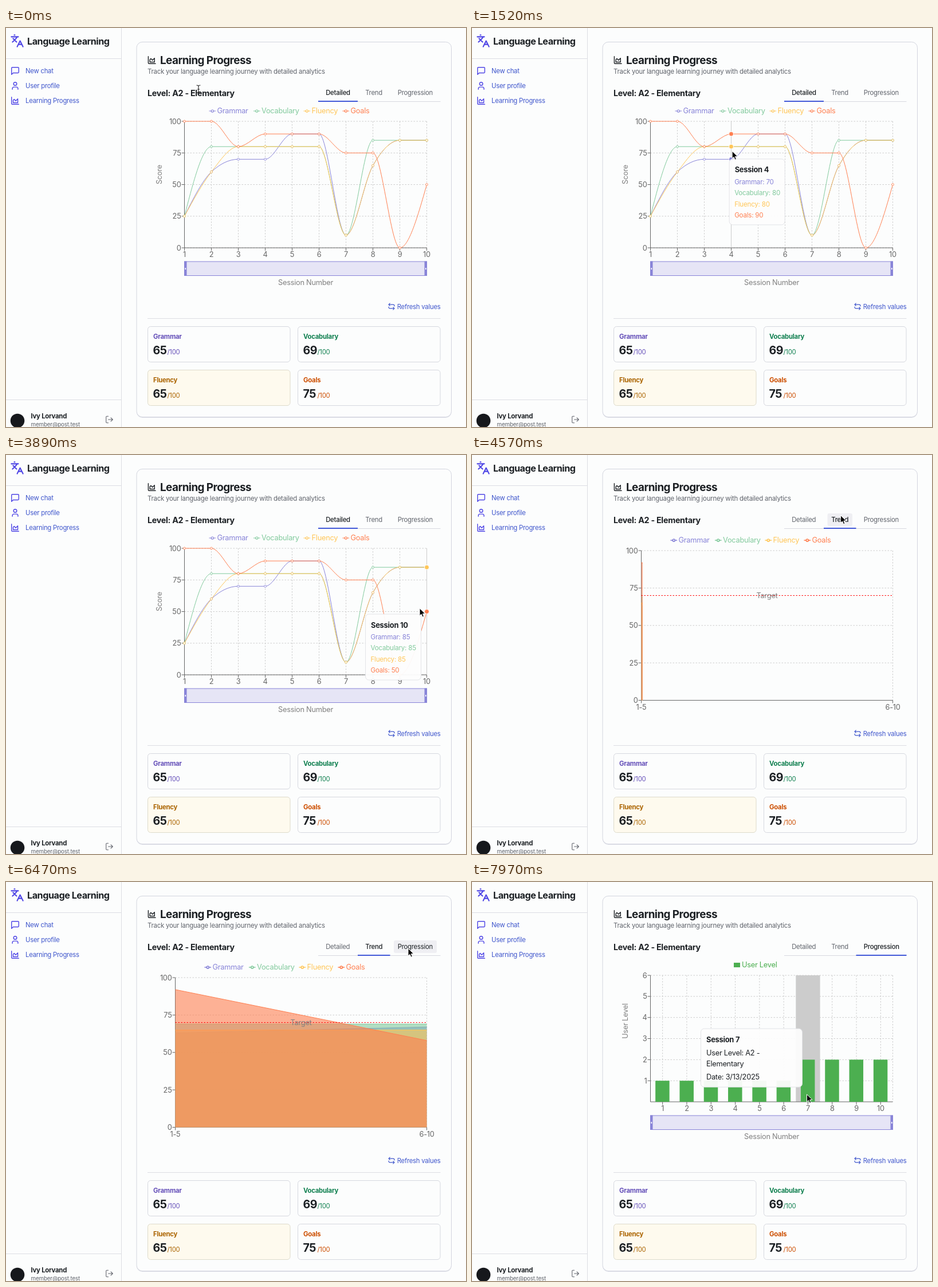
Animation of 803 by 697 pixels, one loop 8000 ms. Source, as an HTML page:

```html
<!DOCTYPE html>
<html lang="en">
<head>
<meta charset="utf-8">
<title>Learning Progress</title>
<style>
html, body { margin: 0; width: 100%; height: 100%; overflow: hidden; background: #fcfdfd; }
svg { display: block; width: 803px; height: 697px; }
text { font-family: Inter, "Open Sans", sans-serif; letter-spacing: -.02em; white-space: pre; }
.icon { fill: none; stroke-linecap: round; stroke-linejoin: round; }
</style>
</head>
<body>
<svg id="stage" viewBox="0 0 803 697" xmlns="http://www.w3.org/2000/svg"></svg>
<script>
const LOOP = 8000, TREND_AT = 4510, LEVELS_AT = 6680;
const HOVER_LAG = 100, GLIDE = 400;
const INK = '#1c2024', GRAY = '#60646c', LINK = '#3f56cc', ACCENT = '#4f46e5', RULE = '#dcdde3';
const SERIES = [
  { name: 'Grammar', color: '#8884d8', tone: '#6550b9', values: [25, 60, 70, 70, 90, 90, 10, 65, 85, 85] },
  { name: 'Vocabulary', color: '#82ca9d', tone: '#0f7f4f', values: [25, 80, 80, 80, 80, 80, 10, 85, 85, 85] },
  { name: 'Fluency', color: '#ffc658', tone: '#ab6400', values: [25, 60, 80, 80, 80, 80, 10, 65, 85, 85] },
  { name: 'Goals', color: '#ff7f50', tone: '#cc4e00', values: [100, 100, 80, 90, 90, 90, 75, 75, 0, 50] }
];
const TABS = [
  { name: 'Detailed', from: 545, to: 614 },
  { name: 'Trend', from: 614, to: 670.5 },
  { name: 'Progression', from: 670.5, to: 758.5 }
];
const sessions = [1, 2, 3, 4, 5, 6, 7, 8, 9, 10];
const scores = [0, 25, 50, 75, 100];
const levelOf = n => n > 6 ? 2 : 1;
const mean = list => list.reduce((a, b) => a + b) / list.length;

// Stops of the pointer: time, x, y
const POINTER = [
  [90, 336, 106], [850, 397, 220], [1240, 428, 220], [1520, 454, 215], [2600, 579, 204],
  [3000, 722, 268], [3890, 722, 268], [4100, 735, 215], [4400, 643.5, 105.5],
  [6120, 643.5, 105.5], [6470, 702, 116], [7147, 702, 116], [7340, 629, 225], [7970, 584.5, 371]
];

const text = (x, mid, str, size = 11.3, fill = INK, extra = '') =>
  `<text x="${x}" y="${mid + size * .36}" font-size="${size}" fill="${fill}" ${extra}>${str}</text>`;
const line = (x1, y1, x2, y2, color = '#666', extra = '') =>
  `<path d="M${x1} ${y1}L${x2} ${y2}" fill="none" stroke="${color}" ${extra}/>`;
const rect = (x, y, w, h, fill, extra = '') =>
  `<rect x="${x}" y="${y}" width="${w}" height="${h}" fill="${fill}" ${extra}/>`;
const icon = (cx, cy, scale, color, d, width = 2) =>
  `<path class="icon" transform="translate(${cx - 12 * scale} ${cy - 12 * scale}) scale(${scale})" d="${d}" stroke="${color}" stroke-width="${width}"/>`;
const BOLD = 'font-weight="700"', MIDDLE = 'text-anchor="middle"', END = 'text-anchor="end"';
const TITLE = 'font-weight="700" style="letter-spacing:-.03em"';
const DASH = 'stroke-dasharray="2.5 2.5"';
const dashed = (...p) => line(...p, '#ccc', DASH);
const upright = (mid, str) => text(0, 0, str, 12.8, '#808080', `${MIDDLE} transform="translate(267 ${mid}) rotate(-90)"`);

const ICONS = {
  languages: 'M5 8l6 6M4 14l6-6 2-3M2 5h12M7 2h1M22 22l-5-10-5 10M14 18h6',
  chat: 'M21 15a2 2 0 0 1-2 2H7l-4 4V5a2 2 0 0 1 2-2h14a2 2 0 0 1 2 2z',
  user: 'M19 21v-2a4 4 0 0 0-4-4H9a4 4 0 0 0-4 4v2M8 7a4 4 0 1 0 8 0a4 4 0 1 0-8 0',
  chart: 'M3 3v16a2 2 0 0 0 2 2h16M7 11l2.5-2.5 4 4 5-5V17H7z',
  logout: 'M9 21H5a2 2 0 0 1-2-2V5a2 2 0 0 1 2-2h4M16 17l5-5-5-5M21 12H9',
  refresh: 'M7 2L3 6l4 4M3 6h14a4 4 0 0 1 4 4v1M17 22l4-4-4-4M21 18H7a4 4 0 0 1-4-4v-1'
};

function sidebar() {
  const items = [['New chat', 'chat'], ['User profile', 'user'], ['Learning Progress', 'chart']].map(([name, key], i) =>
    icon(16, 75 + 26 * i, .7, ACCENT, ICONS[key]) + text(34, 75 + 26 * i, name, 11.3, LINK)).join('');
  return line(201.5, 0, 201.5, 697, RULE) + line(0, 53.5, 201, 53.5, RULE) + line(0, 649.5, 201, 649.5, RULE) +
    icon(19.5, 22.5, 1.02, ACCENT, ICONS.languages) + text(37, 23, 'Language Learning', 16.2, INK, TITLE) + items +
    '<circle cx="20" cy="686" r="12.3" fill="#16181c"/>' +
    text(43.5, 678, 'Ivy Lorvand', 11.3, INK, BOLD) + text(43.5, 692.5, 'member@post.test', 9.9, GRAY) +
    icon(180.5, 684, .64, GRAY, ICONS.logout, 1.7);
}

function card() {
  const stats = SERIES.map((s, i) => {
    const x = 247.5 + (i % 2) * 262, y = 521.5 + (i >> 1) * 76, warm = s.name === 'Fluency';
    return rect(x, y, 248.5, 62, warm ? '#fefaee' : '#fcfdfd', `rx="5" stroke="${warm ? '#dedbcb' : '#d6d8df'}"`) +
      text(x + 9.5, y + 17.5, s.name, 11.3, s.tone, BOLD) + text(x + 9, y + 41.5, mean(s.values), 19.6, INK, BOLD) +
      text(x + 34, y + 44, '/100', 11.3, s.tone);
  }).join('');
  return rect(228, 27, 549.5, 654, '#dfe0e8', 'rx="10"') +
    rect(228, 24.5, 549.5, 655, '#fcfdfd', 'rx="10" stroke="#d3d5df"') +
    icon(254.7, 56, .7, INK, ICONS.chart) + text(269, 56.5, 'Learning Progress', 18.9, INK, TITLE) +
    text(247, 76, 'Track your language learning journey with detailed analytics', 11.4, GRAY) +
    text(247, 113.5, 'Level: A2 - Elementary', 14.3, INK, BOLD) +
    icon(673, 486.5, .56, LINK, ICONS.refresh) + text(758.5, 486.5, 'Refresh values', 11.3, LINK, END) +
    line(247, 507.5, 758.5, 507.5, RULE) + stats;
}

const tabs = () => line(545, 128.5, 758.5, 128.5, '#d8d9e0') + TABS.map((tab, i) =>
  rect(tab.from + 6.5, 102, tab.to - tab.from - 13, 22, '#efeff3', `rx="3" id="pill${i}"`) +
  text(tab.from + 13.2, 113, tab.name, 11.3, GRAY, `id="tab${i}"`)).join('') +
  rect(0, 127, 0, 2, '#4259d8', 'id="underline"');

function legend(dx, mid, width) {
  const starts = [354.5, 432, 519.5, 587.5];
  return SERIES.map((s, i) => {
    const x = starts[i] + dx, pen = `stroke="${s.color}" stroke-width="${width}"`;
    return `<path d="M${x} ${mid + 1}h3.8m4 0h3.8" ${pen}/><circle cx="${x + 5.8}" cy="${mid + 1}" r="2" fill="none" ${pen}/>` +
      text(x + 14, mid, s.name, 12.8, s.color);
  }).join('');
}

const brush = () => rect(311.5, 408, 423, 24.5, '#e6e5f6', 'stroke="#8884d8"') +
  [311, 730.5].map(x => rect(x, 407.5, 4.5, 25.5, '#8884d8') + rect(x + 1.5, 419, 1.6, 3, '#fff')).join('') +
  text(523, 444, 'Session Number', 12.8, '#808080', MIDDLE);

function axes(left, top, bottom, yTicks, xTicks) {
  return line(left, top, left, bottom) + line(left, bottom, 734.5, bottom) +
    yTicks.map(([y, s]) => line(left - 5, y, left, y) + text(left - 6, y, s, 12.8, '#666', END)).join('') +
    xTicks.map(([x, s]) => line(x, bottom, x, bottom + 5) + text(x, bottom + 11.5, s, 12.8, '#666', MIDDLE)).join('');
}

const STEP = 47, BAND = 42.3;
const sessionX = n => 311.5 + (n - 1) * STEP;
const bandX = n => 311.5 + (n - .5) * BAND;
const scoreY = v => 384 - v * 2.21;
const trendY = v => 428.5 - v * 2.615;
const levelY = v => 384 - v * 36.83;

// Monotone cubic through evenly spaced points
function monotone(values) {
  const y = values.map(scoreY), last = y.length - 1;
  const rise = i => y[i + 1] - y[i];
  const m = y.map((_, i) => {
    const a = rise(Math.max(i - 1, 0)), b = rise(Math.min(i, last - 1));
    return (Math.sign(a) + Math.sign(b)) * Math.min(Math.abs(a), Math.abs(b), Math.abs(a + b) / 4);
  });
  m[0] = (3 * rise(0) - m[1]) / 2;
  m[last] = (3 * rise(last - 1) - m[last - 1]) / 2;
  return `M${sessionX(1)} ${y[0]}` + y.slice(1).map((end, i) => {
    const x = sessionX(i + 1);
    return `C${x + STEP / 3} ${y[i] + m[i] / 3} ${x + STEP * 2 / 3} ${end - m[i + 1] / 3} ${x + STEP} ${end}`;
  }).join('');
}

function detailedChart() {
  return scores.map(v => dashed(311.5, scoreY(v), 734.5, scoreY(v))).join('') +
    sessions.map(n => dashed(sessionX(n), 163, sessionX(n), 384)).join('') +
    axes(311.5, 163, 384, scores.map(v => [scoreY(v), v]), sessions.map(n => [sessionX(n), n])) +
    legend(0, 144, 1.2) + upright(256, 'Score') + brush() + '<g id="guide"></g>' +
    SERIES.map(s => `<path d="${monotone(s.values)}" fill="none" stroke="${s.color}"/>` + s.values.map((v, i) =>
      `<circle cx="${sessionX(i + 1)}" cy="${scoreY(v)}" r="1.9" fill="#fff" stroke="${s.color}" stroke-width=".9"/>`).join('')).join('') +
    '<g id="dots"></g>';
}

function trendChart() {
  const areas = SERIES.map(s => {
    const a = trendY(mean(s.values.slice(0, 5))), b = trendY(mean(s.values.slice(5)));
    return `<path d="M295.5 ${a}L734.5 ${b}V428.5H295.5Z" fill="${s.color}" fill-opacity=".6"/>` + line(295.5, a, 734.5, b, s.color);
  }).join('');
  return scores.map(v => dashed(295.5, trendY(v), 734.5, trendY(v))).join('') + dashed(734.5, 167, 734.5, 428.5) +
    axes(295.5, 167, 428.5, scores.map(v => [trendY(v), v]), [[295.5, '1-5'], [734.5, '6-10']]) +
    legend(-8, 148, 1.7) +
    `<clipPath id="reveal">${rect(295, 160, 0, 270, '#000', 'id="revealBox"')}</clipPath><g clip-path="url(#reveal)">${areas}</g>` +
    line(295.5, trendY(70), 734.5, trendY(70), '#f00', DASH) + text(515, trendY(70), 'Target', 12.8, '#808080', MIDDLE);
}

function levelChart() {
  const levels = [1, 2, 3, 4, 5, 6];
  return levels.map(v => dashed(311.5, levelY(v), 734.5, levelY(v))).join('') +
    sessions.map(n => dashed(bandX(n), 163, bandX(n), 384)).join('') + dashed(734.5, 163, 734.5, 384) +
    rect(0, 163, BAND, 221, '#ccc', 'id="band"') +
    axes(311.5, 163, 384, levels.map(v => [levelY(v), v]), sessions.map(n => [bandX(n), n])) +
    rect(457, 141, 11, 8, '#4caf50') + text(471, 144, 'User Level', 12.8, '#4caf50') +
    upright(243, 'User Level') + brush() +
    sessions.map(n => rect(bandX(n) - 12.5, 384, 24.5, 0, '#4caf50', `id="bar${n}"`)).join('');
}

const tipSize = page => page === 2 ? [177, 102] : [97, 115];

function tipContent(n, page) {
  const rows = page === 2
    ? [['User Level: A2 -', 42], ['Elementary', 61], ['Date: 3/13/2025', 84]].map(([s, y]) => text(9.5, y, s, 12.8))
    : SERIES.map((s, i) => text(9, 39.5 + i * 19.5, `${s.name}: ${s.values[n - 1]}`, 11.6, s.color));
  return rect(0, 0, ...tipSize(page), '#fdfdfd', 'rx="6" fill-opacity=".95" stroke="#e3e4e8"') +
    text(9.5, 19, 'Session ' + n, 12.9, INK, BOLD) + rows.join('');
}

document.getElementById('stage').innerHTML = rect(0, 0, 803, 697, '#fcfdfd') + sidebar() + card() + tabs() +
  [detailedChart, trendChart, levelChart].map((draw, i) => `<g id="chart${i}">${draw()}</g>`).join('') +
  '<g id="tip"></g>' +
  `<g id="pointer"><path id="arrow" d="M0 0V13L3 10.4 5.1 15.2 7.3 14.2 5.3 9.6 9.4 9.2Z" fill="#000" stroke="#fff" stroke-linejoin="round"/>
   <path id="beam" class="icon" d="M-3-6Q0-6 0-4Q0-6 3-6M0-4V5M-3 7Q0 7 0 5Q0 7 3 7M-1.5 1H1.5" stroke="#222" stroke-width="1.1"/></g>`;

const el = Object.fromEntries([...document.querySelectorAll('[id]')].map(e => [e.id, e]));
const set = (id, attrs) => { for (const k in attrs) el[id].setAttribute(k, attrs[k]); };
const show = (id, on) => set(id, { display: on ? 'inline' : 'none' });
const clamp = p => Math.max(0, Math.min(1, p));
const pageAt = t => t < TREND_AT ? 0 : t < LEVELS_AT ? 1 : 2;

// cubic-bezier(.25, .1, .25, 1)
function ease(p) {
  if (p <= 0 || p >= 1) return clamp(p);
  let lo = 0, hi = 1, s = .5;
  for (let i = 0; i < 20; i++, s = (lo + hi) / 2) {
    if (.75 * s * (1 - s) + s ** 3 < p) lo = s; else hi = s;
  }
  return .3 * s * (1 - s) ** 2 + 3 * s * s * (1 - s) + s ** 3;
}

function pointerAt(t) {
  const last = POINTER.length - 1;
  const i = Math.max(1, POINTER.findIndex((stop, k) => stop[0] > t || k === last));
  const a = POINTER[i - 1], b = POINTER[i];
  let p = clamp((t - a[0]) / (b[0] - a[0]));
  if (i === last) p = 1 - (1 - p) ** 3; // settles gently at the end
  return [a[1] + (b[1] - a[1]) * p, a[2] + (b[2] - a[2]) * p];
}

// Session under the pointer, 0 outside the plot
function hoverAt(t) {
  const [x, y] = pointerAt(t - HOVER_LAG), page = pageAt(t);
  if (page === 1 || y < 163 || y > 384) return 0;
  return page === 0 ? Math.round((x - 311.5) / STEP) + 1 : Math.floor((x - 311.5) / BAND) + 1;
}

// Beside the hovered session, flipped where the chart has no room
function tipGoal(t) {
  const n = hoverAt(t), page = pageAt(t), [w, h] = tipSize(page);
  if (!n) return [247, 129];
  const x = page === 2 ? bandX(n) : sessionX(n), y = pointerAt(t - HOVER_LAG)[1];
  return [x + 10 + w > 758 || page === 2 ? x - 10 - w : x + 10, y + 10 + h > 452 ? y - 10 - h : y + 10];
}

// Every change of goal is eased in over the glide time
const GLIDE_STEPS = 40;
const glideWeights = Array.from({ length: GLIDE_STEPS }, (_, k) => ease((k + 1) / GLIDE_STEPS) - ease(k / GLIDE_STEPS));
function tipAt(t) {
  return glideWeights.reduce((sum, weight, k) => {
    const goal = tipGoal(t - GLIDE * (k + .5) / GLIDE_STEPS);
    return [sum[0] + weight * goal[0], sum[1] + weight * goal[1]];
  }, [0, 0]);
}

let shown = '';
function render(t) {
  const page = pageAt(t), session = hoverAt(t), [px, py] = pointerAt(t);

  TABS.forEach((tab, i) => {
    const over = py > 98 && py < 126 && px > tab.from + 6 && px < tab.to - 6;
    show('chart' + i, i === page);
    show('pill' + i, over);
    set('tab' + i, { fill: i === page || over ? INK : GRAY, 'font-weight': i === page ? 500 : 400 });
  });
  set('underline', { x: TABS[page].from, width: TABS[page].to - TABS[page].from });

  set('revealBox', { width: 440 * ease((t - TREND_AT - 40) / 1430) });
  const grow = ease((t - LEVELS_AT) / 400);
  sessions.forEach(n => {
    const y = levelY(levelOf(n) * grow);
    set('bar' + n, { y, height: 384 - y });
  });

  const key = page + ':' + session;
  if (key !== shown) {
    shown = key;
    const lit = session && page === 0, x = sessionX(session);
    el.guide.innerHTML = lit ? line(x, 163, x, 384, '#ccc') : '';
    el.dots.innerHTML = lit ? SERIES.map(s =>
      `<circle cx="${x}" cy="${scoreY(s.values[session - 1])}" r="4" fill="${s.color}" stroke="#fff"/>`).join('') : '';
    el.tip.innerHTML = session ? tipContent(session, page) : '';
    show('band', session && page === 2);
    set('band', { x: bandX(session) - BAND / 2 });
  }
  if (session) set('tip', { transform: `translate(${tipAt(t)})` });
  set('pointer', { transform: `translate(${px} ${py})` });
  show('beam', t < 150);
  show('arrow', t >= 150);
}

function tick() {
  render(performance.now() % LOOP);
  requestAnimationFrame(tick);
}
tick();
</script>
</body>
</html>
```
